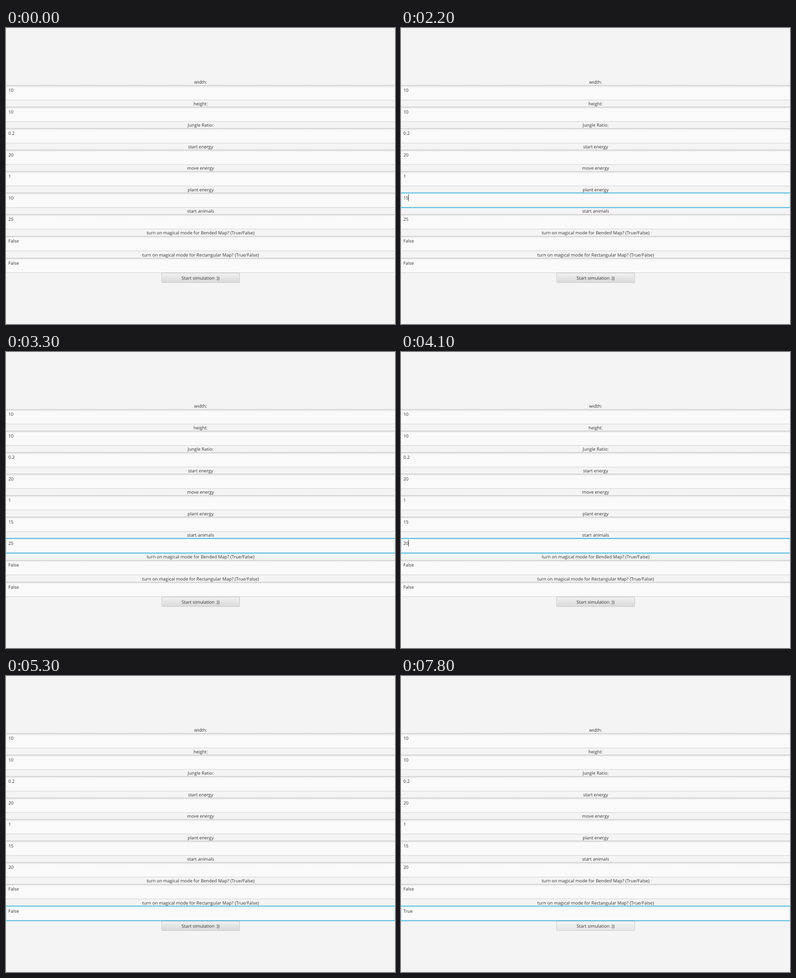
Animation of 857x654 px, one loop 8 s. Source, as an HTML page:

```html
<!DOCTYPE html>
<html lang="en">
<head>
<meta charset="utf-8">
<title>Simulation settings</title>
<style>
html, body { margin: 0; width: 100%; height: 100%; overflow: hidden; background: #f4f4f4; }
svg { display: block; }
text { font: 9.83px "Open Sans", "Noto Sans", sans-serif; fill: #333; text-rendering: geometricPrecision; }
.label { text-anchor: middle; }
</style>
</head>
<body>
<svg id="stage" width="857" height="654" viewBox="0 0 857 654">
  <defs>
    <linearGradient id="shade" x2="0" y2="1">
      <stop stop-color="#e6e6e6"/><stop offset=".14" stop-color="#fafafa"/>
    </linearGradient>
    <linearGradient id="edge" x2="0" y2="1">
      <stop stop-color="#b4b4b4"/><stop offset="1" stop-color="#cbcbcb"/>
    </linearGradient>
    <linearGradient id="face" x2="0" y2="1">
      <stop stop-color="#efefef"/><stop offset="1" stop-color="#d9d9d9"/>
    </linearGradient>
    <linearGradient id="hover" x2="0" y2="1">
      <stop stop-color="#f5f5f5"/><stop offset="1" stop-color="#e4e4e4"/>
    </linearGradient>
  </defs>
</svg>
<script>
const LOOP = 8000, HEIGHT = 33, LEFT = 5.2;
const stage = document.getElementById("stage");

const rows = [
  ["width:", "10"], ["height:", "10"], ["Jungle Ratio:", "0.2"],
  ["start energy", "20"], ["move energy", "1"], ["plant energy", "10"],
  ["start animals", "25"],
  ["turn on magical mode for Bended Map? (True/False)", "False"],
  ["turn on magical mode for Rectangular Map? (True/False)", "False"]
];

// time, focused row, its text, caret visible
const steps = [
  [1100, 5, "10", 0], [1300, 5, "10", 1], [1800, 5, "1", 1], [2200, 5, "15", 1],
  [2700, 5, "15", 0], [3100, 5, "15", 1],
  [3300, 6, "25", 0], [3500, 6, "25", 1], [3600, 6, "2", 1], [4100, 6, "20", 1],
  [4600, 6, "20", 0], [5000, 6, "20", 1],
  [5300, 8, "False", 0], [5500, 8, "Fals", 1], [5900, 8, "Fa", 1], [6000, 8, "", 1],
  [6500, 8, "T", 1], [6700, 8, "Tr", 1], [6900, 8, "Tru", 1], [7100, 8, "True", 1],
  [7500, 8, "True", 0]
];
const HOVER_AT = 7800;

function add(tag, attrs, parent = stage) {
  const el = document.createElementNS("http://www.w3.org/2000/svg", tag);
  for (const key in attrs) el.setAttribute(key, attrs[key]);
  parent.append(el);
  return el;
}

function box(x, y, width, height, fill, parent, rx = 0) {
  return add("rect", { x, y, width, height, fill, rx }, parent);
}

function label(x, y, words, cls = "label") {
  const el = add("text", { x, y, class: cls });
  el.textContent = words;
  return el;
}

const top0 = i => 126.6 + 47.5 * i + (i > 6 ? 0.7 * (i - 6) : 0);

// button
box(342.7, 541.2, 172.4, 21.9, "#b4b4b4", stage, 2.6);
box(343.6, 542.1, 170.6, 20.1, "#f8f8f8", stage, 2);
const face = box(344.5, 543, 168.8, 19.2, "url(#face)", stage, 1.5);
label(428.6, 555.5, "Start simulation :))");

const fields = rows.map(([name, value], i) => {
  const y = top0(i);
  box(-1, y, 859, HEIGHT, "url(#edge)");
  box(-1, y + 0.9, 859, HEIGHT - 1.8, "url(#shade)");

  const ring = add("g", {});
  box(-1, y - 0.2, 859, HEIGHT + 0.4, "#039ed3", ring);
  box(0, y + 0.9, 857, HEIGHT - 1.8, "#fafafa", ring);
  box(-2, y - 1.2, 861, HEIGHT + 2.4, "#039ed322", ring);
  box(1.6, y + 2.6, 853.8, HEIGHT - 5.2, "#fafafa", ring);

  label(428.7, y - 3.4, name);
  return { ring, value, text: label(LEFT, y + 14.6, value, "value") };
});
const caret = box(0, 0, 1, 15, "#333");

function draw(now) {
  const t = now % LOOP;
  const values = rows.map(row => row[1]);
  let focus = -1, blink = 0;
  for (const [at, row, words, on] of steps) {
    if (at > t) break;
    values[row] = words;
    focus = row;
    blink = on;
  }
  fields.forEach((field, i) => {
    field.text.textContent = values[i];
    field.ring.setAttribute("visibility", i === focus ? "visible" : "hidden");
  });
  caret.setAttribute("visibility", blink ? "visible" : "hidden");
  if (blink) {
    caret.setAttribute("x", Math.floor(LEFT + fields[focus].text.getComputedTextLength()));
    caret.setAttribute("y", top0(focus) + 3.2);
  }
  face.setAttribute("fill", t >= HOVER_AT ? "url(#hover)" : "url(#face)");
}

const start = performance.now();
function tick() {
  draw(performance.now() - start);
  requestAnimationFrame(tick);
}
tick();
</script>
</body>
</html>
```
